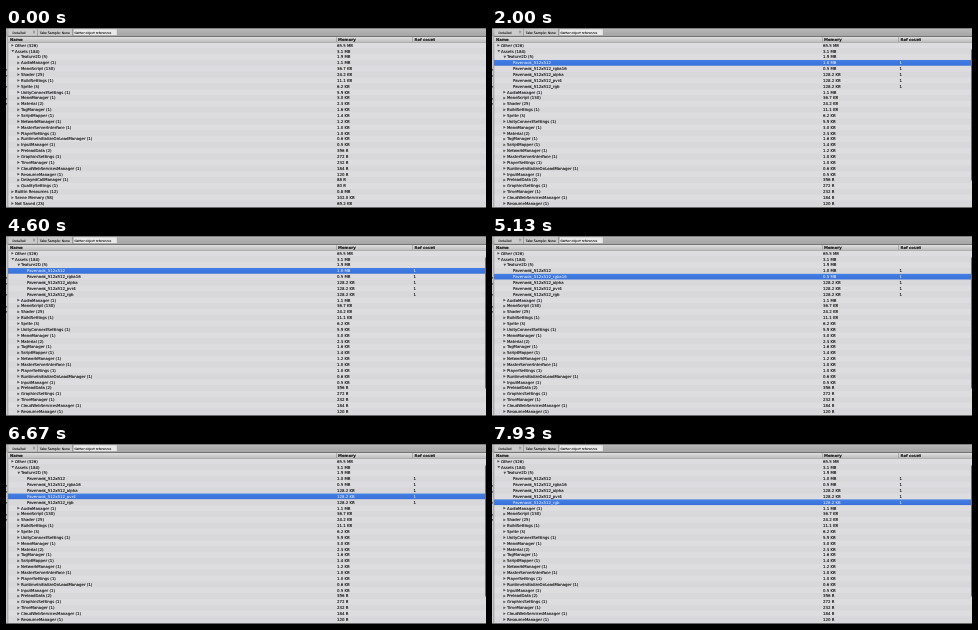
Animation of 480x180 px, one loop 8 s. Source, as an HTML page:

```html
<!DOCTYPE html>
<html lang="en">
<head>
<meta charset="utf-8">
<title>Memory profiler</title>
<style>
  html, body { margin: 0; width: 100%; height: 100%; overflow: hidden; background: #dad9dc; }
  svg { display: block; width: 480px; height: 180px; }
  text { font: 11px "DejaVu Sans", sans-serif; fill: #141414; stroke: #141414; stroke-width: .35; text-rendering: geometricPrecision; white-space: pre; }
  .bold { font-weight: bold; }
  .arrow { fill: #505050; }
  .selected text { fill: #fff; stroke: none; }
</style>
</head>
<body>
<svg id="stage" viewBox="0 0 480 180">
  <defs>
    <linearGradient id="bar" x2="0" y2="1"><stop stop-color="#bababa"/><stop offset="1" stop-color="#a3a3a3"/></linearGradient>
    <linearGradient id="head" x2="0" y2="1"><stop stop-color="#e0e0e0"/><stop offset="1" stop-color="#bebebe"/></linearGradient>
    <linearGradient id="pick" x2="0" y2="1"><stop stop-color="#427fe4"/><stop offset="1" stop-color="#3a70d9"/></linearGradient>
  </defs>
  <rect width="480" height="180" fill="#dad9dc"/>
  <g id="rows"></g>
  <g id="chrome"></g>
</svg>
<script>
const LOOP = 8000, PITCH = 5.86, TOP = 14.4;
const MEMORY_X = 331, REFS_X = 407.4;

// Depth, label, memory
const roots = [[0, "Other (326)", "65.5 MB"], [0, "Assets (184)", "3.1 MB"], [1, "Texture2D (5)", "1.9 MB"]];

const textures = [
  ["", "1.0 MB"], ["_rgba16", "0.5 MB"], ["_alpha", "128.2 KB"], ["_pvr4", "128.2 KB"], ["_rgb", "128.2 KB"]
].map(([suffix, size]) => [2, "Pavenook_512x512" + suffix, size]);

const others = `AudioManager (1)|1.1 MB
MonoScript (130)|36.7 KB
Shader (25)|24.2 KB
BuildSettings (1)|11.1 KB
Sprite (3)|6.2 KB
UnityConnectSettings (1)|5.9 KB
MonoManager (1)|3.0 KB
Material (2)|2.3 KB
TagManager (1)|1.6 KB
ScriptMapper (1)|1.4 KB
NetworkManager (1)|1.2 KB
MasterServerInterface (1)|1.0 KB
PlayerSettings (1)|1.0 KB
RuntimeInitializeOnLoadManager (1)|0.6 KB
InputManager (1)|0.5 KB
PreloadData (2)|396 B
GraphicsSettings (1)|272 B
TimeManager (1)|232 B
CloudWebServicesManager (1)|184 B
ResourceManager (1)|120 B
DelayedCallManager (1)|88 B
QualitySettings (1)|80 B`.split("\n").map(line => [1, ...line.split("|")]);

const tail = [[0, "Builtin Resources (12)", "0.8 MB"], [0, "Scene Memory (58)", "102.0 KB"], [0, "Not Saved (23)", "69.2 KB"]];

const collapsed = [...roots, ...others, ...tail];
const expanded = [...roots, ...textures, ...others, ...tail].slice(0, 28);

// Start time, selected row
const steps = [[0, -1], [1930, 3], [4730, 4], [5470, 5], [6270, 6], [6870, 7]];

const text = (x, y, label, size = 3.9, cls = "") =>
  `<text class="${cls}" transform="translate(${x} ${y}) scale(${size / 11})">${label}</text>`;
const rect = (x, y, w, h, fill, extra = "") =>
  `<rect x="${x}" y="${y}" width="${w}" height="${h}" fill="${fill}" ${extra}/>`;

function arrow(x, y, open) {
  const shape = open ? "h2.8l-1.4 2.4z" : "v2.8l2.4 -1.4z";
  return `<path class="arrow" d="M${x} ${y - (open ? 1.2 : 1.4)}${shape}"/>`;
}

function row([depth, label, memory], i, selected) {
  const y = TOP + i * PITCH, mid = y + 2.9, base = mid + 1.4;
  const x = 9 + depth * 6;
  const open = label.startsWith("Assets") || (label.startsWith("Texture2D") && selected >= 0);
  const isPicked = i === selected;
  const fill = isPicked ? "url(#pick)" : i % 2 ? "#d8d7da" : "#dddcdf";
  return `<g class="${isPicked ? "selected" : ""}">` + rect(2, y, 478, PITCH, fill) +
    (depth < 2 ? arrow(x - 3.6, mid, open) : "") +
    text(x, base, label) + text(MEMORY_X, base, memory) +
    (depth === 2 ? text(REFS_X, base, "1") : "") + "</g>";
}

function drawChrome() {
  document.getElementById("chrome").innerHTML =
    rect(0, 0, 2, 180, "#c9c9cb") + rect(1.6, 8, 0.6, 172, "#85858a") +
    [41, 47, 58, 70, 75].map(y => rect(0, y, 1, 1.6, "#555")).join("") +
    rect(0, 0, 480, 8.4, "url(#bar)") + rect(0, 0, 480, 0.7, "#6a6a6a") +
    rect(2.5, 0.8, 28.5, 6.8, "#cbcbcb") + rect(31, 0.6, 0.5, 7, "#808080") +
    rect(31.8, 0.8, 34.6, 6.8, "#cbcbcb") + rect(66.4, 0.6, 0.5, 7, "#808080") +
    rect(67.2, 0.9, 44, 6.6, "#e9e9e9", 'rx=".6" stroke="#888" stroke-width=".4"') +
    text(6.5, 5.5, "Detailed", 3.1) +
    '<path class="arrow" d="M27.2 3.7h1.6l-.8-1.2zM27.2 4.6h1.6l-.8 1.2z"/>' +
    text(33.8, 5.5, "Take Sample: None", 3.15) +
    text(68.4, 5.5, "Gather object references", 2.97) +
    rect(2, 8, 478, 1, "#747474") + rect(2, 9, 478, 5, "url(#head)") +
    rect(2, 14, 478, 0.5, "#858585") +
    [330, 406].map(x => rect(x, 9, 0.5, 5, "#848484")).join("") +
    text(4, 12.9, "Name", 3.92, "bold") + text(332, 12.9, "Memory", 3.92, "bold") +
    text(408.6, 12.9, "Ref count", 3.8, "bold") +
    rect(0, 179, 480, 1, "#6a6a6a");
}

const rowsGroup = document.getElementById("rows");
let shown;

function render(time) {
  const selected = steps.findLast(([start]) => start <= time)[1];
  if (selected === shown) return;
  shown = selected;
  const isExpanded = selected >= 0;
  const list = isExpanded ? expanded : collapsed;
  const scrollbar = isExpanded ? rect(479, 21.5, 1, 131, "#6e6e72") : "";
  rowsGroup.innerHTML = list.map((item, i) => row(item, i, selected)).join("") + scrollbar;
}

drawChrome();
render(0);
const begin = performance.now();
requestAnimationFrame(function tick() {
  render((performance.now() - begin) % LOOP);
  requestAnimationFrame(tick);
});
</script>
</body>
</html>
```
